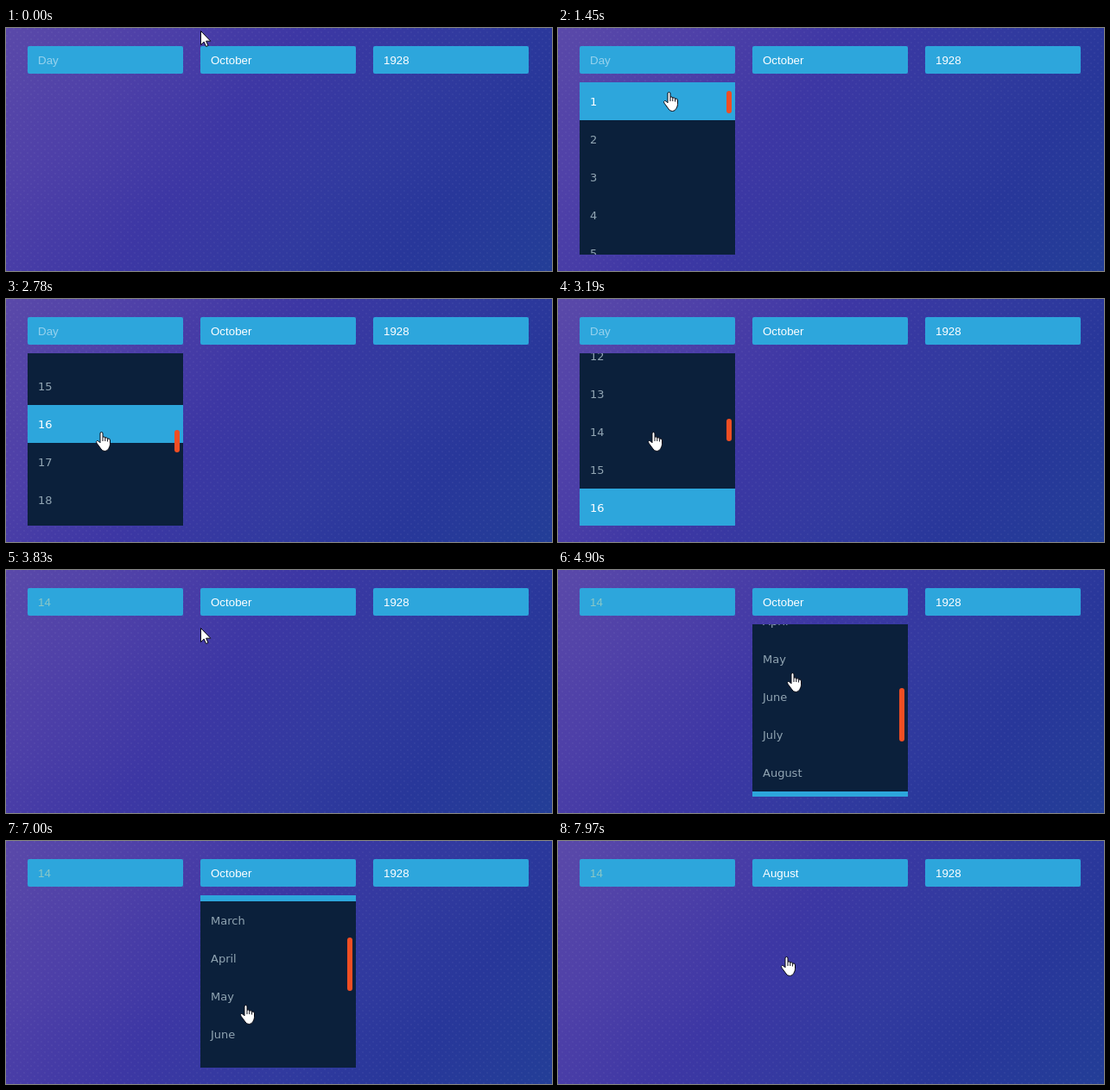
Write an HTML page with a canvas that moves like this. It is 632x282 px and loops after 8000 ms.

```html
<!DOCTYPE html>
<html lang="en">
<head>
<meta charset="utf-8">
<title>Date dropdowns</title>
<style>
  html, body { margin: 0; width: 100%; height: 100%; overflow: hidden; }
  canvas { display: block; }
</style>
</head>
<body>
<canvas id="stage" width="632" height="282"></canvas>
<script>
const W = 632, H = 282, LOOP = 8000;
const ctx = document.getElementById('stage').getContext('2d');

const BLUE = '#2da6dc', NAVY = '#0b203b', ORANGE = '#f04e23';
const LIST_TOP = 63, LIST_H = 200, ROW = 44, TRACK_TOP = 73, TRACK_H = 180;
const MONTHS = ['Month', 'January', 'February', 'March', 'April', 'May', 'June', 'July',
  'August', 'September', 'October', 'November', 'December'];
const DAYS = Array.from({ length: 31 }, (_, i) => String(i + 1));

// Scroll spans: start, end, from, to
const lists = [
  { x: 25, items: DAYS, first: 0, open: 840, close: 3570,
    scrolls: [[1840, 2200, 0, 400], [2226, 2326, 400, 500], [2360, 2630, 500, 600], [2950, 3220, 600, 500]] },
  { x: 225, items: MONTHS, first: 1, open: 4210, close: 7970,
    scrolls: [[4768, 5050, 372, 0], [6890, 7140, 0, 300]] }
];

// Pointer tip: time, x, y
const path = [
  [80, 225, 3], [640, 127, 33],
  [1320, 127, 33], [1660, 127, 158],
  [2660, 127, 158], [2780, 109, 154],
  [3220, 109, 154], [3370, 102, 143],
  [3730, 102, 143], [3830, 225, 67], [4030, 251, 34],
  [4550, 251, 34], [4750, 270, 119],
  [5580, 270, 119], [5800, 272, 88],
  [6100, 272, 88], [6390, 274, 146],
  [6520, 274, 146], [6670, 276, 190],
  [7200, 276, 190], [7540, 263, 134]
];

const clamp01 = v => Math.min(1, Math.max(0, v));
const smooth = v => { const k = clamp01(v); return k * k * (3 - 2 * k); };

function pointerAt(t) {
  let i = 0;
  while (i < path.length - 2 && t > path[i + 1][0]) i++;
  const [t0, x0, y0] = path[i], [t1, x1, y1] = path[i + 1];
  const k = smooth((t - t0) / (t1 - t0));
  return { x: x0 + (x1 - x0) * k, y: y0 + (y1 - y0) * k };
}

function scrollAt(list, t) {
  let pos = list.scrolls[0][2];
  for (const [t0, t1, from, to] of list.scrolls) {
    if (t >= t0) pos = from + (to - from) * smooth((t - t0) / (t1 - t0));
  }
  return pos;
}

// The hovered row stays the same while the list is scrolling.
function hoveredRow(list, t) {
  const active = list.scrolls.find(([t0, t1]) => t >= t0 && t < t1);
  const time = active ? active[0] : t;
  const p = pointerAt(time);
  if (p.y < LIST_TOP || p.x < list.x || p.x > list.x + 180) return -1;
  const row = Math.floor((p.y - LIST_TOP + scrollAt(list, time)) / ROW);
  return row >= list.first ? row : -1;
}

function box(x, y, w, h, r, color) {
  ctx.fillStyle = color;
  ctx.beginPath();
  ctx.roundRect(x, y, w, h, r);
  ctx.fill();
}

function text(str, x, y, color, font) {
  ctx.font = font;
  ctx.fillStyle = color;
  ctx.fillText(str, x, y);
}

function makeBackdrop() {
  const c = document.createElement('canvas');
  c.width = W;
  c.height = H;
  const g = c.getContext('2d');
  const fill = g.createLinearGradient(0, 0, 523, 419);
  [[0, '#5a49a9'], [0.2, '#4e40a8'], [0.4, '#3d37a4'], [0.62, '#313a9f'], [0.78, '#28379a'], [1, '#233e97']]
    .forEach(([stop, color]) => fill.addColorStop(stop, color));
  g.fillStyle = fill;
  g.fillRect(0, 0, W, H);
  g.fillStyle = 'rgba(255,255,255,0.035)';
  for (let y = 0, odd = 0; y < H; y += 4, odd ^= 1) {
    for (let x = odd * 4; x < W; x += 8) g.fillRect(x, y, 2, 2);
  }
  return c;
}
const backdrop = makeBackdrop();

function drawField(x, label, color) {
  box(x, 21, 180, 32, 2, BLUE);
  text(label, x + 12, 42, color, '13.333px "Liberation Sans", Arial, sans-serif');
}

function drawList(list, t) {
  const { x, items } = list;
  const scroll = scrollAt(list, t), hover = hoveredRow(list, t);
  ctx.save();
  ctx.beginPath();
  ctx.rect(x, LIST_TOP, 180, LIST_H);
  ctx.clip();
  box(x, LIST_TOP, 180, LIST_H, 0, NAVY);
  items.forEach((label, i) => {
    const y = Math.round(LIST_TOP + i * ROW - scroll);
    if (y < LIST_TOP - ROW || y > LIST_TOP + LIST_H) return;
    if (i === hover) box(x, y, 180, ROW, 0, BLUE);
    text(label, x + 12, y + 27, i === hover ? '#fff' : '#91a5b3', '13px "DejaVu Sans", Verdana, sans-serif');
  });
  const ratio = TRACK_H / (items.length * ROW);
  box(x + 170, Math.round(TRACK_TOP + scroll * ratio), 6, Math.floor(LIST_H * ratio), 3, ORANGE);
  ctx.restore();
}

const arrow = new Path2D('M.5.5V16.6L4.2 13.1 6.6 18.5 9 17.5 6.6 12.2H11.8Z');
const hand = new Path2D('M5 2Q5 .5 6.5 .5T8 2V6.2Q10.5 5.2 10.8 7 13.2 6.2 13.6 8 16.5 7.4 16.5 10' +
  'V14.5Q16.5 17 14.8 19.5 13.5 22.5 10.5 22.5 7.2 22.5 6 20L1 13.2Q-.2 11.2 1.5 10.5 3 10.2 5 12.8Z');
const knuckles = new Path2D('M8 6.2V11M10.8 7V11M13.6 8V11.5');

function drawPointer(t) {
  const p = pointerAt(t);
  const overField = p.y >= 21 && p.y < 53 && (p.x - 25) % 200 < 180 && p.x >= 25;
  const isHand = overField || (t >= 640 && t < 3740) || t >= 4030;
  ctx.save();
  ctx.translate(Math.round(p.x) - (isHand ? 5 : 0), Math.round(p.y));
  ctx.fillStyle = '#fff';
  ctx.strokeStyle = '#0a0a14';
  ctx.lineWidth = 1;
  const shape = isHand ? hand : arrow;
  ctx.fill(shape);
  ctx.stroke(shape);
  if (isHand) ctx.stroke(knuckles);
  ctx.restore();
}

function draw(t) {
  ctx.drawImage(backdrop, 0, 0);
  const [day, month] = lists;
  const dayChosen = t >= day.close;
  drawField(25, dayChosen ? '14' : 'Day', dayChosen ? '#8bc8c6' : '#96d2ed');
  drawField(225, t >= month.close ? 'August' : 'October', '#fff');
  drawField(425, '1928', '#fff');
  for (const list of lists) {
    if (t >= list.open && t < list.close) drawList(list, t);
  }
  drawPointer(t);
}

function tick() {
  draw(performance.now() % LOOP);
  requestAnimationFrame(tick);
}
tick();
</script>
</body>
</html>
```
